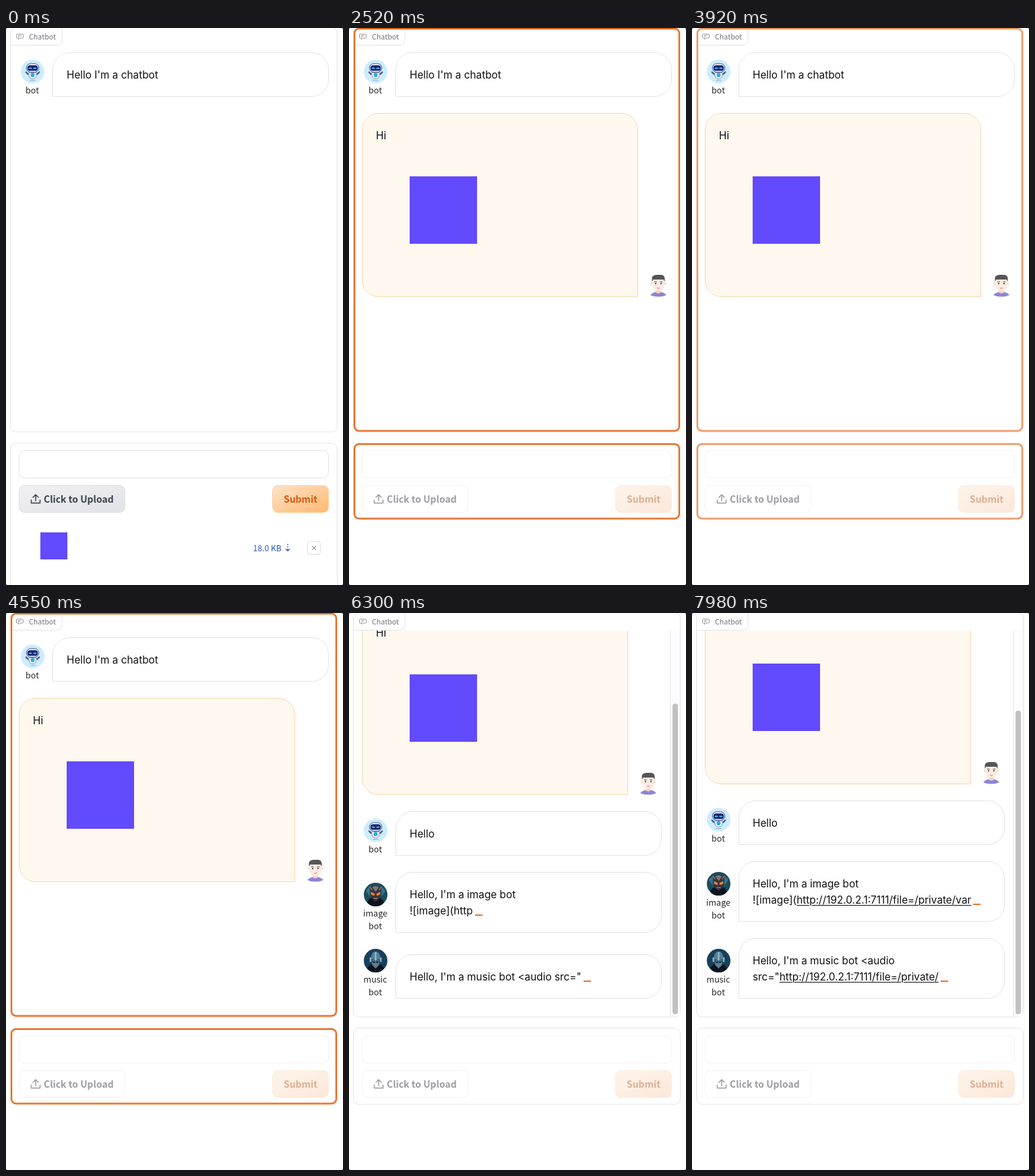
An HTML page that plays this animation: 500 by 826 pixels, repeating every 8 s.

```html
<!DOCTYPE html>
<html lang="en">
<head>
<meta charset="utf-8">
<title>Chatbot</title>
<style>
html, body { margin: 0; width: 100%; height: 100%; overflow: hidden; background: #777; }
#stage {
  position: relative; width: 500px; height: 826px; overflow: hidden;
  background: #fff; border-radius: 3px;
  font-family: "Noto Sans CJK SC", "Noto Sans CJK JP", "Noto Sans CJK", "Open Sans", sans-serif;
}
#ui { position: absolute; inset: 0; }
#ui text { white-space: pre; }
.line { fill: none; stroke: #e4e4e7; }

#chat { position: absolute; left: 7px; top: 26px; width: 484px; height: 572px; overflow: hidden; }
#list {
  position: absolute; left: 12px; top: 10px; width: 460px;
  display: flex; flex-direction: column; gap: 24.5px;
}
.stream #list { top: auto; bottom: 26.5px; width: 445px; }
.row { display: flex; align-items: flex-end; }
.who {
  width: 40px; margin-right: 10px; text-align: center;
  font-size: 12.5px; line-height: 19.25px; color: #27272a;
}
.who svg { display: block; width: 35px; height: 35px; margin: 0 auto; }
.bubble {
  flex: 1; box-sizing: border-box; min-height: 65.5px; padding: 20.75px 20px 18.75px;
  border: 1px solid #e4e4e7; border-radius: 25px 25px 25px 0; background: #fff;
  font: 15.35px/24px Inter, "Liberation Sans", sans-serif; color: #101014; white-space: pre;
}
.user .bubble {
  position: relative; height: 273px; border-color: #fad7ae;
  border-radius: 25px 25px 0 25px; background: #fff8ee;
}
.user svg { width: 30px; height: 34px; margin: 0 5px 0 15px; }
.picture { position: absolute; left: 70px; top: 93px; width: 100px; height: 100px; background: #624aff; }
.cursor { display: inline-block; width: 11px; height: 2px; margin-left: 3px; vertical-align: -2.5px; background: #e8762f; }
u { text-underline-offset: 2px; text-decoration-thickness: 1px; }

#stage:not(.busy) .whenBusy, .busy .whenIdle,
#stage:not(.stream) .whenStream, .stream .whenPulse { display: none; }
</style>
</head>
<body>
<div id="stage">
  <div id="chat">
    <div id="list">
      <div class="row">
        <div class="who"><svg><use href="#robot"/></svg>bot</div>
        <div class="bubble">Hello I'm a chatbot</div>
      </div>
      <div class="row user whenBusy">
        <div class="bubble">Hi<div class="picture"></div></div>
        <svg><use href="#person"/></svg>
      </div>
      <div class="row whenStream">
        <div class="who"><svg><use href="#robot"/></svg>bot</div>
        <div class="bubble" id="plain"><span></span><u></u><i class="cursor"></i></div>
      </div>
      <div class="row whenStream">
        <div class="who"><svg><use href="#painter"/></svg>image bot</div>
        <div class="bubble" id="image"><span></span><u></u><i class="cursor"></i></div>
      </div>
      <div class="row whenStream">
        <div class="who"><svg><use href="#singer"/></svg>music bot</div>
        <div class="bubble" id="music"><span></span><u></u><i class="cursor"></i></div>
      </div>
    </div>
  </div>

  <svg id="ui" width="500" height="826">
    <defs>
      <linearGradient id="grey" x2="1" y2="1"><stop stop-color="#f1f1f3"/><stop offset="1" stop-color="#e1e2e6"/></linearGradient>
      <linearGradient id="orange" x2="1" y2="1"><stop stop-color="#ffe3c8"/><stop offset="1" stop-color="#ffb871"/></linearGradient>
      <linearGradient id="pale" x2="1" y2="1"><stop stop-color="#fef4ea"/><stop offset="1" stop-color="#fce8da"/></linearGradient>
      <symbol id="robot" viewBox="0 0 36 36">
        <circle cx="18" cy="18" r="18" fill="#cdecfd"/>
        <path d="M11 22 8 19M25 22l3-3" stroke="#44598a" stroke-width="2.4" stroke-linecap="round"/>
        <path d="M12 20h12l-1 7q-5 4-10 0z" fill="#fff" stroke="#6d83ad" stroke-width=".8"/>
        <circle cx="18" cy="23.500" r="3.2" fill="#35a9dd"/>
        <rect x="8.5" y="6" width="19" height="13" rx="6.500" fill="#f7fbff" stroke="#364f94"/>
        <rect x="10" y="8.500" width="16" height="8.500" rx="4" fill="#17246b"/>
        <path d="M13 13h3M20 13h3" stroke="#56c8ff" stroke-width="2" stroke-linecap="round"/>
        <path d="M14 31.500h8" stroke="#8da7bd"/>
      </symbol>
      <symbol id="painter" viewBox="0 0 36 36">
        <circle cx="18" cy="18" r="18" fill="#1d4c5c"/>
        <path d="M3 12 9 6v15zM33 12l-6-6v15z" fill="#37758a"/>
        <path d="M5 30q3-7 9-7h8q6 0 9 7-5 6-13 6T5 30z" fill="#0c151d"/>
        <path d="M10 14q0-10 8-10t8 10l-2 10-6 5-6-5z" fill="#34343d"/>
        <path d="M13 7q5-4 10 0l-5 7z" fill="#77777d"/>
        <path d="m11 14 6 3-1 3-5-2zm14 0-6 3 1 3 5-2z" fill="#f5813a"/>
        <path d="m9 6 4 5M27 6l-4 5M15 24h6" stroke="#b5704f" stroke-width="1.5"/>
      </symbol>
      <symbol id="singer" viewBox="0 0 36 36">
        <circle cx="18" cy="18" r="18" fill="#17405a"/>
        <path d="M5 30q4-7 10-7h6q6 0 10 7-5 6-13 6T5 30z" fill="#0a141f"/>
        <path d="M11 15q0-11 7-11t7 11l-2 10-5 5-5-5z" fill="#567f94"/>
        <path d="M18 5v13M10 13v7M26 13v7" stroke="#a3c6d5" stroke-width="2"/>
        <path d="m12 16 5 2v4l-4-2zm12 0-5 2v4l4-2z" fill="#0b1420"/>
        <path d="m13 18 3 1M23 18l-3 1" stroke="#62d2ee" stroke-width="1.3"/>
      </symbol>
      <symbol id="person" viewBox="0 0 30 34">
        <path d="M3 31q5-5 12-5t12 5q-5 2.500-12 2.500T3 31z" fill="#8f84d4"/>
        <path d="M11 21h8v6q-4 3-8 0z" fill="#f5d3c2"/>
        <circle cx="5.500" cy="14" r="2" fill="#f8dccd"/><circle cx="24.500" cy="14" r="2" fill="#f8dccd"/>
        <path d="M6 7h18v9q-1 9-9 9t-9-9z" fill="#fdebe1"/>
        <path d="M5.500 11V5Q7 1 13 1h7q4 1 4.500 5v5l-2-3h-15z" fill="#585457"/>
        <path d="M9 11.500h3.500M17.500 11.500H21" stroke="#585457"/>
        <circle cx="11" cy="14" r="1.100" fill="#333"/><circle cx="19" cy="14" r="1.100" fill="#333"/>
        <path d="M13 20.500q2 1.500 4 0" fill="none" stroke="#d9776a"/>
      </symbol>
    </defs>

    <rect class="line" x="6.500" y="-.5" width="485" height="599.500" rx="8"/>
    <path class="line" d="M7 25.500H75q8 0 8-8V0"/>
    <path d="M16.500 9h8q1 0 1 1v4q0 1-1 1h-4l-2 2v-2h-2q-1 0-1-1v-4q0-1 1-1zM18 11h5M18 13h3" fill="none" stroke="#92929a" stroke-width=".9"/>
    <text x="34" y="17" font-size="10.700" fill="#71717a">Chatbot</text>

    <g class="whenStream">
      <rect x="477" y="26" width="14" height="572" fill="#fcfcfc"/>
      <path class="line" d="M476.500 26V598.500"/>
      <rect id="thumb" x="480" width="8" rx="4" fill="#c1c1c1"/>
    </g>

    <g class="whenIdle">
      <rect class="line" x="6.500" y="615.500" width="485" height="230" rx="8"/>
      <rect class="line" x="19.500" y="626.500" width="459" height="41" rx="8"/>
      <g id="focus" fill="none">
        <rect x="19" y="626" width="460" height="42" rx="8.500" stroke="#dcebfa" stroke-width="3"/>
        <rect x="19.500" y="626.500" width="459" height="41" rx="8" stroke="#9cc4ec"/>
      </g>
      <text id="typed" x="29.500" y="651.500" font-size="12.500" fill="#27272a"></text>
      <rect id="caret" y="638" width="1" height="18" fill="#18181b"/>
      <rect x="19.500" y="678.500" width="157" height="40" rx="8" fill="url(#grey)" stroke="#dedfe4"/>
      <rect x="395.500" y="678.500" width="83" height="40" rx="8" fill="url(#orange)" stroke="#fdcf9f"/>
      <rect x="51" y="748" width="40" height="40" fill="#624aff"/>
      <text x="366.500" y="775.500" font-size="12.200" fill="#2b55cc">18.0 KB</text>
      <path d="M418 765v2m0 1.500v2m0 1.500v3m-3-2.500 3 3 3-3" fill="none" stroke="#2b55cc" stroke-width="1.200"/>
      <rect x="447.500" y="762.500" width="19" height="19" rx="4" fill="#ececee"/>
      <rect x="447.500" y="761.500" width="19" height="19" rx="4" fill="#fff" stroke="#dedee2"/>
      <path d="m454 768 6 6m0-6-6 6" stroke="#71717a"/>
    </g>

    <g class="whenBusy">
      <rect class="line" x="6.500" y="615.500" width="485" height="113" rx="8"/>
      <g fill="none" stroke="#f1f1f3">
        <rect x="19.500" y="626.500" width="459" height="41" rx="8"/>
        <rect x="19.500" y="678.500" width="157" height="40" rx="8"/>
      </g>
      <rect x="395.500" y="678.500" width="83" height="40" rx="8" fill="url(#pale)" stroke="#fdecdc"/>
      <g id="pulse" class="whenPulse" fill="none">
        <g stroke="#fbdcc6" stroke-width="4">
          <rect x="8" y="1" width="482" height="596.500" rx="7"/>
          <rect x="8" y="617" width="482" height="110.500" rx="7"/>
        </g>
        <g stroke="#e6691f" stroke-width="2">
          <rect x="8" y="1" width="482" height="596.500" rx="7"/>
          <rect x="8" y="617" width="482" height="110.500" rx="7"/>
        </g>
      </g>
    </g>

    <g id="upload">
      <path d="M37.500 700v4.500h13V700M44 701v-9m-4 4 4-4 4 4" fill="none" stroke="currentColor" stroke-width="1.500" stroke-linecap="round" stroke-linejoin="round"/>
      <text x="56" y="703.500" font-size="13.950" font-weight="600" fill="currentColor">Click to Upload</text>
    </g>
    <text id="submit" x="412" y="703.500" font-size="13.950" font-weight="600">Submit</text>
  </svg>
</div>

<script>
const LOOP = 8000, FOCUS = 420, TYPE_H = 1750, TYPE_I = 2170, SEND = 2310, PULSE = 2480, STREAM = 4585;
const CHAR_MS = 47.6, BLINK = 490, WRAP_AT = 48;
const URL_BASE = "http://192.0.2.1:7111/file=/private/";
const $ = id => document.getElementById(id);
const clamp = v => Math.max(0, Math.min(1, v));

// Types head then link; the link is underlined once it holds a host.
function type(id, count, head, link = "") {
  const [plain, linked, cursor] = $(id).children;
  const shown = link.slice(0, Math.max(0, count - head.length));
  const isLink = shown.length > 7;
  plain.textContent = head.slice(0, count) + (isLink ? "" : shown);
  linked.textContent = isLink ? shown : "";
  cursor.style.display = count >= head.length && !link ? "none" : "";
}

function drawInput(t) {
  const word = t < TYPE_H ? "" : t < TYPE_I ? "H" : "Hi";
  const lastKey = t < TYPE_H ? FOCUS : t < TYPE_I ? TYPE_H : TYPE_I;
  const caretOn = t >= FOCUS && Math.floor((t - lastKey) / BLINK) % 2 === 0;
  $("focus").style.opacity = clamp((t - FOCUS) / 140);
  $("typed").textContent = word;
  $("caret").setAttribute("x", [30, 38.5, 42.5][word.length]);
  $("caret").style.opacity = caretOn ? 1 : 0;
}

function drawStream(t) {
  const progress = (t - STREAM) / CHAR_MS;
  const count = Math.floor(progress), musicCount = Math.max(0, Math.floor(progress - 0.3));
  const wrapped = musicCount >= WRAP_AT;
  type("plain", count, "Hello");
  type("image", count, "Hello, I'm a image bot\n![image](", URL_BASE + "var");
  type("music", musicCount, `Hello, I'm a music bot <audio${wrapped ? "\n" : " "}src="`, URL_BASE);
  const top = 124 + 10.4 * ((count >= 23) + wrapped);
  $("thumb").setAttribute("y", top);
  $("thumb").setAttribute("height", 595 - top);
}

function draw(now) {
  const t = now % LOOP;
  const busy = t >= SEND, streaming = t >= STREAM;
  $("stage").classList.toggle("busy", busy);
  $("stage").classList.toggle("stream", streaming);
  $("upload").style.color = busy ? "#9c9ca2" : "#3b4150";
  $("submit").style.fill = busy ? "#dfae92" : "#d9570f";
  $("pulse").style.opacity = 0.75 + 0.25 * Math.cos((t - PULSE) / 1000 * Math.PI);
  if (!busy) drawInput(t);
  if (streaming) drawStream(t);
  requestAnimationFrame(draw);
}
draw(performance.now());
</script>
</body>
</html>
```
